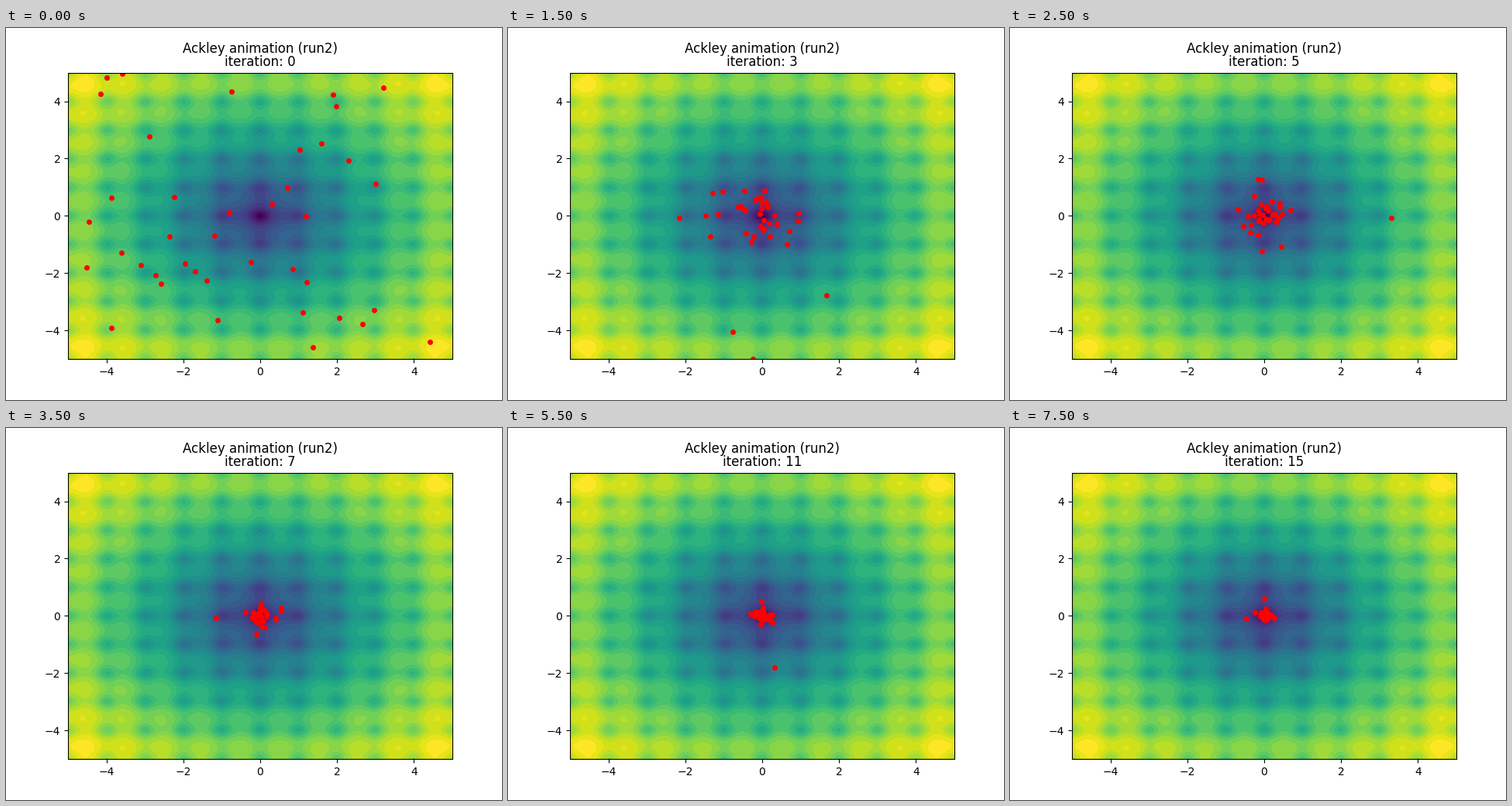
A matplotlib script for the animation above (8 s loop, 640 by 480 pixels).

```python
import numpy as np
import matplotlib.pyplot as plt
from matplotlib.animation import FuncAnimation

SIZE = 40
ITERATIONS = 16
STEP_MS = 500
LIMIT = 5
REACH = (3.3, LIMIT)  # farthest strays after the first move
BAND = 0.5


def ackley(x, y):
    radius = np.sqrt(0.5 * (x ** 2 + y ** 2))
    ripple = 0.5 * (np.cos(2 * np.pi * x) + np.cos(2 * np.pi * y))
    return 20 + np.e - 20 * np.exp(-0.2 * radius) - np.exp(ripple)


def swarm(i):
    """Uniform start, then a shrinking heavy-tailed cloud around the optimum."""
    rng = np.random.default_rng(40 + i)
    if i == 0:
        return rng.uniform(-LIMIT, LIMIT, (SIZE, 2))
    spread = 0.05 + 1.4 * np.exp(-0.4 * i)
    cloud = spread * rng.standard_t(2, (SIZE, 2))
    return np.clip(cloud, np.negative(REACH), REACH)


fig, ax = plt.subplots(figsize=(6.4, 4.8), dpi=100)
axis = np.linspace(-LIMIT, LIMIT, 301)
X, Y = np.meshgrid(axis, axis)
levels = np.arange(0, 14.5 + BAND / 2, BAND)
ax.contourf(X, Y, ackley(X, Y), levels=levels, cmap="viridis",
            vmin=levels[0] + BAND / 2, vmax=levels[-1] - BAND / 2)
ax.set(xlim=(-LIMIT, LIMIT), ylim=(-LIMIT, LIMIT))
dots, = ax.plot([], [], "ro", markersize=4)
title = ax.set_title("", linespacing=0.92)


def update(i):
    dots.set_data(*swarm(i).T)
    title.set_text(f"Ackley animation (run2)\niteration: {i}")
    return dots, title


anim = FuncAnimation(fig, update, frames=ITERATIONS, interval=STEP_MS,
                     repeat=True, repeat_delay=0, blit=False)
plt.show()
```
